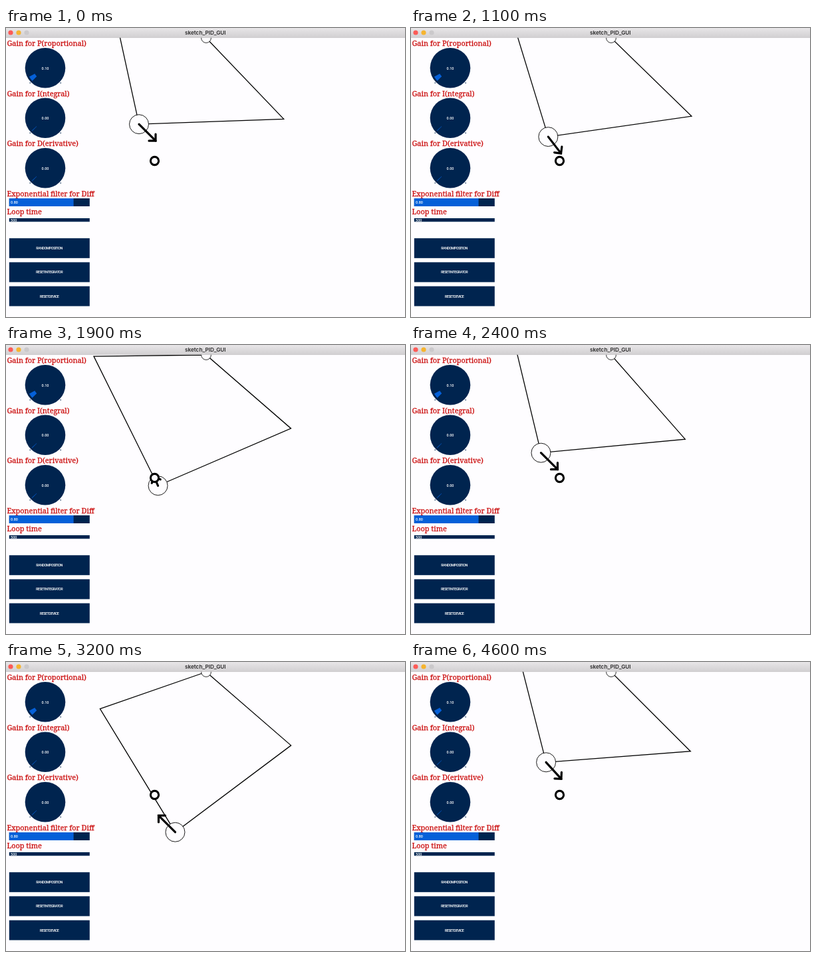
Animation, 600 px wide and 436 px high, one loop 4.7 s. Source, as an HTML page with a canvas:

```html
<!DOCTYPE html>
<html lang="en">
<head>
<meta charset="utf-8">
<title>sketch_PID_GUI</title>
<style>
html, body { margin: 0; width: 100%; height: 100%; overflow: hidden; background: #fefdff; }
canvas { display: block; width: 600px; height: 436px; }
</style>
</head>
<body>
<canvas id="stage"></canvas>
<script>
const W = 600, H = 436, LOOP = 4700, STEP = 100;
const PAPER = '#fefdff', NAVY = '#00244f', BLUE = '#0560d8', RED = '#cc1212';
const BASE = { x: 301, y: 15 }, TARGET = { x: 223.5, y: 200.5 };
const UPPER = 169, LOWER = 217.8, MAX_FORCE = 25, GAIN = 1.12;

// Turning points of the swing: time in seconds, left arm angle; top and bottom alternate
const TURNS = [
  [-0.01, -29.3], [0.65, 22], [1.285, -30.8], [1.67, 22], [2.187, -29.5],
  [3.069, 23], [3.74, -18.8], [4.15, 16], [4.69, -29.3], [5.35, 22]
];

const canvas = document.getElementById('stage');
const ctx = canvas.getContext('2d');
const dpr = window.devicePixelRatio || 1;
canvas.width = W * dpr;
canvas.height = H * dpr;

// Left arm eases between turns; the right arm follows the same phase with a lag
function armAngles(t) {
  const i = TURNS.findIndex(turn => turn[0] > t) - 1;
  const [t0, from] = TURNS[i], [t1, to] = TURNS[i + 1];
  const u = Math.PI * (t - t0) / (t1 - t0), p = u + Math.PI * (i % 2);
  const left = from + (to - from) * (1 - Math.cos(u)) / 2;
  const right = 44.7 + 2.2 * Math.cos(p) + 3 * Math.sin(p) - 0.7 * Math.cos(3 * p);
  return [left, right].map(deg => deg * Math.PI / 180);
}

function linkage(t) {
  const [l, r] = armAngles(t);
  const left = { x: BASE.x - UPPER * Math.cos(l), y: BASE.y + UPPER * Math.sin(l) };
  const right = { x: BASE.x + UPPER * Math.cos(r), y: BASE.y + UPPER * Math.sin(r) };
  const dx = right.x - left.x, dy = right.y - left.y, gap = Math.hypot(dx, dy);
  const drop = Math.sqrt(LOWER * LOWER - gap * gap / 4);
  const tool = {
    x: (left.x + right.x) / 2 - dy / gap * drop,
    y: (left.y + right.y) / 2 + dx / gap * drop
  };
  return { left, right, tool };
}

function box(x, y, w, h, color) {
  ctx.fillStyle = color;
  ctx.fillRect(x, y, w, h);
}

function disc(x, y, r, fill, width) {
  ctx.beginPath();
  ctx.arc(x, y, r, 0, 7);
  ctx.fillStyle = fill;
  ctx.fill();
  if (width) {
    ctx.lineWidth = width;
    ctx.strokeStyle = '#000';
    ctx.stroke();
  }
}

function path(points, width, close) {
  ctx.beginPath();
  points.forEach(p => ctx.lineTo(p.x, p.y));
  if (close) ctx.closePath();
  ctx.lineWidth = width;
  ctx.strokeStyle = '#000';
  ctx.stroke();
}

function text(s, x, y, font, color, align = 'left', spacing = 0) {
  ctx.font = font;
  ctx.fillStyle = color;
  ctx.textAlign = align;
  ctx.letterSpacing = spacing + 'px';
  ctx.fillText(s, x, y);
  ctx.letterSpacing = '0px';
}

function label(s, y) {
  text(s, 1.5, y, '10.9px "Noto Serif", serif', RED);
  ctx.lineWidth = 0.3;
  ctx.strokeStyle = RED;
  ctx.strokeText(s, 1.5, y);
}

function tiny(s, x, y, align, spacing) {
  text(s, x, y, '500 5.5px Roboto, sans-serif', '#fff', align, spacing);
}

function knob(y, value) {
  const x = 59, start = Math.PI * 0.75;
  disc(x, y, 30.3, NAVY);
  box(x - 23.5, y + 22, 1.5, 1.2, NAVY);
  box(x + 22.5, y + 22, 1.5, 1.2, NAVY);
  const sweep = Math.max(value * 2.8, 0.03);
  ctx.beginPath();
  ctx.arc(x, y, 27.5, start, start + sweep);
  ctx.arc(x, y, 18, start + sweep, start, true);
  ctx.fillStyle = BLUE;
  ctx.fill();
  tiny(value.toFixed(2), x, y + 2.2, 'center');
}

function slider(s, y, h, fill) {
  box(4.8, y, 121, h, NAVY);
  box(4.8, y, 121 * fill, h, BLUE);
  tiny(s, 7, y + h / 2 + 2);
}

function panel() {
  ['P(roportional)', 'I(ntegral)', 'D(erivative)'].forEach((s, i) => {
    label('Gain for ' + s, 27 + 75.5 * i);
    knob(60.3 + 75.5 * i, i ? 0 : 0.1);
  });
  label('Exponential filter for Diff', 253.5);
  slider('0.80', 257, 12, 0.8);
  label('Loop time', 281);
  slider('500', 287, 5.3, 0);
  ['RANDOMPOSITION', 'RESETINTEGRATOR', 'RESETDEVICE'].forEach((s, i) => {
    const y = 317.2 + 36.2 * i;
    box(4.8, y, 121, 30, NAVY);
    tiny(s, 65, y + 17, 'center', -0.6);
  });
}

function titleBar() {
  const shade = ctx.createLinearGradient(0, 0, 0, 14);
  shade.addColorStop(0, '#e8e6e8');
  shade.addColorStop(1, '#d2d0d2');
  box(0, 0, W, 14, shade);
  box(0, 14, W, 0.8, '#c4c2c4');
  ['#fc5b57', '#f6b42f', '#cbc9cb'].forEach((c, i) => disc(7 + 12 * i, 7, 3.6, c));
  text('sketch_PID_GUI', 299.8, 9.6, '600 8.2px Inter, sans-serif', '#2b2a2b', 'center');
}

function arrow(from) {
  const clamp = v => Math.max(-MAX_FORCE, Math.min(MAX_FORCE, v * GAIN));
  const dx = clamp(TARGET.x - from.x), dy = clamp(TARGET.y - from.y);
  const tip = { x: from.x + dx, y: from.y + dy };
  const back = Math.atan2(-dy, -dx);
  const barb = s => ({
    x: tip.x + 10 * Math.cos(back + s * Math.PI / 4),
    y: tip.y + 10 * Math.sin(back + s * Math.PI / 4)
  });
  ctx.lineCap = 'round';
  path([from, tip], 3.2);
  path([barb(-1), tip, barb(1)], 3.2);
  ctx.lineCap = 'butt';
}

function draw(t) {
  ctx.setTransform(dpr, 0, 0, dpr, 0, 0);
  box(0, 0, W, H, PAPER);
  panel();
  const { left, right, tool } = linkage(t);
  path([BASE, left, tool, right], 1.3, true);
  disc(BASE.x, BASE.y, 7.4, PAPER, 0.8);
  disc(tool.x, tool.y, 14.5, PAPER, 0.9);
  arrow(tool);
  disc(TARGET.x, TARGET.y, 6.1, PAPER, 3.1);
  titleBar();
}

const begin = performance.now();
function tick() {
  const ms = Math.max(0, performance.now() - begin) % LOOP;
  draw(Math.floor(ms / STEP) * STEP / 1000);
  requestAnimationFrame(tick);
}
tick();
</script>
</body>
</html>
```
